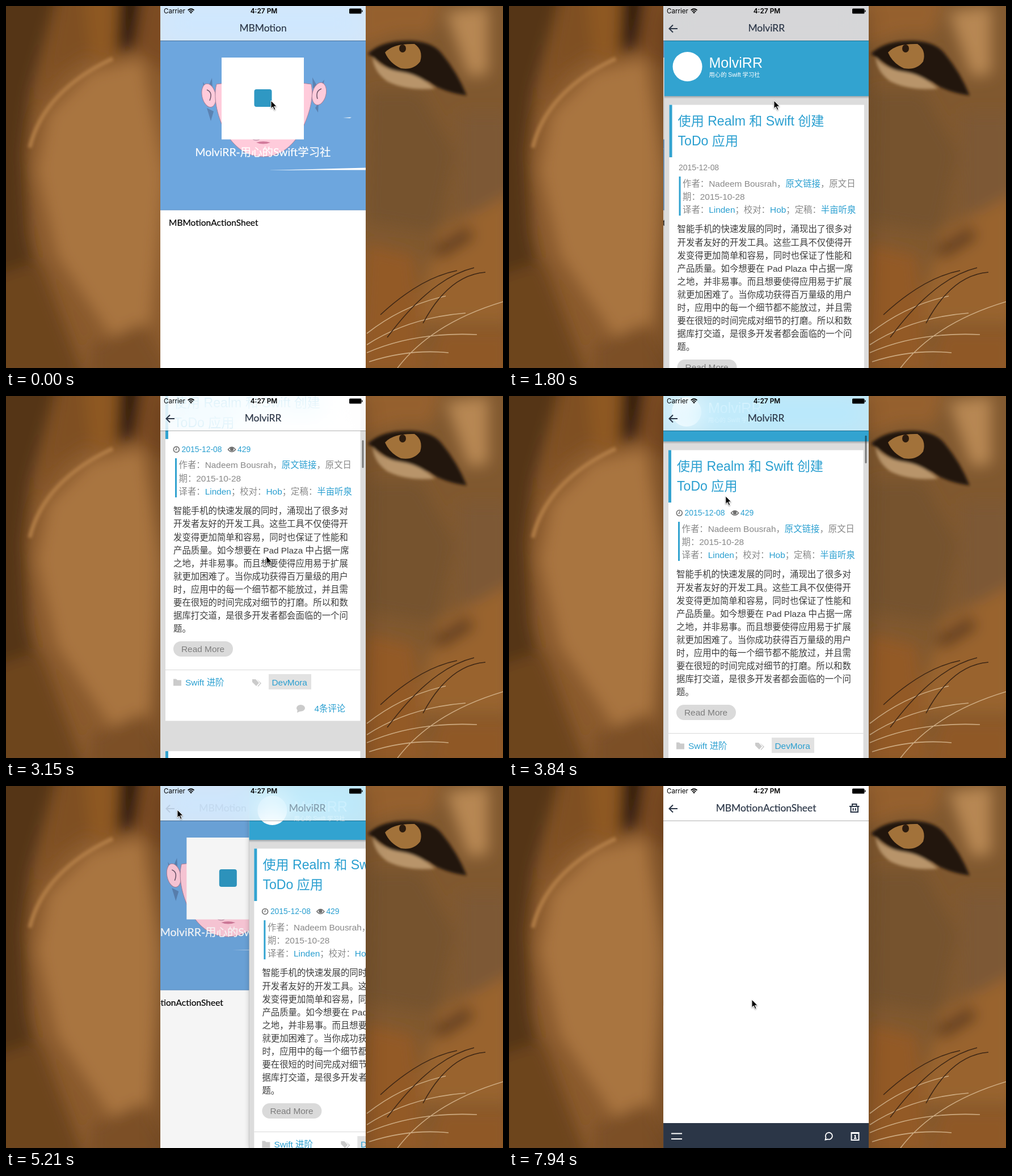
Animation of 876x639 px, one loop 8000 ms. Source, as an HTML page:

```html
<!DOCTYPE html>
<html lang="zh-CN">
<head>
<meta charset="utf-8">
<title>MBMotion</title>
<style>
  html, body { margin: 0; width: 100%; height: 100%; overflow: hidden; background: #7d5128; }
  svg { position: absolute; left: 0; top: 0; display: block; }
  text { font-family: "Liberation Sans", "Noto Sans CJK SC", "Noto Sans CJK", sans-serif; white-space: pre; }
  .geo { font-family: Lato, "Noto Sans CJK SC", "Noto Sans CJK", sans-serif; stroke-width: .2px; }
  .ui { font-family: Inter, sans-serif; }
  #phone, #glow { position: absolute; left: 272px; top: 0; width: 362px; height: 639px; }
  #phone { overflow: hidden; background: #fff; }
  #web, #sheet { box-shadow: 0 0 9px rgba(0, 0, 0, .2); }
  #nav { position: absolute; left: 0; top: 0; width: 362px; height: 61px;
    background: rgba(255, 255, 255, .72); backdrop-filter: blur(24px) saturate(1.6);
    box-shadow: 0 1px 0 rgba(0, 0, 0, .3); }
</style>
</head>
<body>
<svg id="photo" width="876" height="639">
  <defs>
    <filter id="soft" x="-50%" y="-50%" width="200%" height="200%"><feGaussianBlur stdDeviation="13"/></filter>
    <filter id="fine" x="-50%" y="-50%" width="200%" height="200%"><feGaussianBlur stdDeviation="2.5"/></filter>
  </defs>
  <rect width="272" height="639" fill="#8a5a2d"/>
  <rect x="634" width="242" height="639" fill="#80582f"/>
  <g filter="url(#soft)">
    <path d="M-40 -30H95L70 60 45 150 32 260 40 400 60 500-40 580Z" fill="#543517"/>
    <path d="M95 -30H150L150 80 90 120 50 200Z" fill="#7f5023"/>
    <path d="M135 -30H205L195 95 150 95Z" fill="#8e5824"/>
    <path d="M200 -30H240L228 70 195 85Z" fill="#26160a"/>
    <path d="M245 -30H300V130L225 75Z" fill="#7b4b22"/>
    <path d="M150 115 240 95 280 300 255 560 190 590 90 440 55 290 75 190Z" fill="#a97440"/>
    <path d="M-30 480 60 450 140 660H-30Z" fill="#6d451f"/>
    <path d="M150 600 240 560 300 660H150Z" fill="#7b4f27"/>
    <path d="M620 -20H770L750 50 690 50 620 75Z" fill="#95602d"/>
    <path d="M775 10 850 0 850 120 815 125Z" fill="#b78752"/>
    <path d="M640 150 730 150 790 260 760 400 634 380Z" fill="#76522f"/>
    <path d="M800 190H890V360L800 370Z" fill="#7d5834"/>
    <path d="M760 400 890 330V560L720 560Z" fill="#99642f"/>
    <path d="M634 420 720 440 740 650H620Z" fill="#935a27"/>
    <path d="M760 570H890V660H740Z" fill="#8f5826"/>
    <path d="M750 430 815 390 825 408 765 445Z" fill="#4f321a"/>
  </g>
  <g filter="url(#fine)">
    <path d="M638 84Q660 64 695 62 748 58 768 84 796 118 812 158 770 152 745 134 690 124 662 102Z" fill="#20140b"/>
    <path d="M646 90Q662 112 700 117 730 122 756 146 705 150 672 133 648 116 646 90Z" fill="#b8946a"/>
    <path d="M42 250Q66 150 188 93" fill="none" stroke="#b07b45" stroke-width="7"/>
  </g>
  <path d="M668 82Q682 66 720 67 736 78 730 98 718 114 696 110 676 101 668 82Z" fill="#a2723a"/>
  <ellipse cx="699" cy="75" rx="6" ry="7" fill="#2b1b0e"/>
  <g fill="none" stroke="#cdab82" stroke-width="1.6">
    <path d="M636 578Q700 528 775 512M636 598Q710 550 810 542M636 612Q720 575 830 580M640 628Q710 605 780 612M690 639Q750 560 876 522"/>
  </g>
  <path d="M672 585Q750 480 825 462M660 545Q730 480 795 467M735 560Q780 475 845 470" fill="none" stroke="#3d2615" stroke-width="1.5"/>
</svg>
<div id="glow"></div>
<div id="phone">
  <svg id="home"></svg>
  <svg id="web"></svg>
  <svg id="sheet"></svg>
  <div id="nav"></div>
  <svg id="bar"></svg>
</div>
<svg width="876" height="639">
  <path id="cursor" d="M0 0V14L3.2 11 5.8 16.6 8 15.6 5.5 10.2H10Z" fill="#000" stroke="#fff" stroke-width="1"
    style="filter:drop-shadow(0 1px 1px rgba(0,0,0,.4))"/>
</svg>
<script>
const $ = id => document.getElementById(id);
const BLUE = '#2a9fd0', INK = '#2b3647', W = 362, LOOP = 8000;

const rect = (x, y, w, h, fill, more = '') =>
  `<rect x="${x}" y="${y}" width="${w}" height="${h}" fill="${fill}" ${more}/>`;
const text = (x, y, size, fill, str, more = '') =>
  `<text x="${x}" y="${y}" font-size="${size}" fill="${fill}" ${more}>${str}</text>`;
const geo = (x, y, size, fill, str, more = '') =>
  text(x, y, size, fill, str, `class="geo" stroke="${fill}" ${more}`);
const lines = (x, y, fill, rows) =>
  rows.map((s, i) => text(x, y + i * 23.1, 15.4, fill, s)).join('');
const link = s => `<tspan fill="${BLUE}">${s}</tspan>`;

// Every view uses stage coordinates
function view(id, html) {
  const el = $(id);
  el.setAttribute('viewBox', '272 0 362 639');
  el.setAttribute('width', W);
  el.setAttribute('height', 639);
  el.innerHTML = html;
}

view('home', `
  ${rect(272, 0, W, 639, '#fff')}${rect(272, 0, W, 360, '#6da6de')}${rect(272, 359.5, W, 1, '#5f92c6')}
  <path d="M349 148 347 134 355 146 363 127 364 146ZM541 145 540 126 550 144 561 130 558 146ZM354 180 361 203 366 186ZM545 180 550 188 551 170Z" fill="#5b82b2"/>
  <g fill="#ffcbdb" stroke="#a98099" stroke-width="1">
    <ellipse cx="357.5" cy="158" rx="12" ry="21" transform="rotate(-12 357 158)"/>
    <ellipse cx="552" cy="155" rx="12" ry="20" transform="rotate(14 552 155)"/>
    <path d="M371 138C364 165 375 200 386 221 402 250 425 266 453 266S504 250 520 221C531 200 544 165 538 138Q455 125 371 138Z"/>
    <path d="M354 148Q365 152 359 167M556 146Q545 150 549 164" fill="none" stroke="#6b5368" stroke-width="1.5"/>
    <ellipse cx="441" cy="233" rx="7" ry="4"/>
  </g>
  <path d="M441 241Q453 237 466 241 453 246 441 241Z" fill="#d27b9b"/>
  <path d="M594 197 609 196.5 606 198ZM460 290 540 288 634 285.5V289.5L540 289.5Z" fill="#fff"/>
  ${rect(380, 91, 145, 144.5, '#fff')}${rect(437.5, 147, 31, 31, '#2f98c3', 'rx="4"')}
  ${geo(453, 264.5, 19.4, '#fff', 'MolviRR-用心的Swift学习社', 'text-anchor="middle"')}
  ${geo(287, 388, 15.5, '#000', 'MBMotionActionSheet')}
  ${rect(272, 0, W, 639, '#000', 'id="dim"')}`);

view('web', `
  ${rect(272, 0, W, 639, '#6c6e72')}
  <g id="page">
    ${rect(272, 61, W, 900, '#dcdcdc')}
    ${rect(272, 159, W, 2, '#a9afb3')}${rect(272, 161, W, 2, '#c8cacb')}
    ${rect(272, 61, W, 98, '#32a3d0')}
    <circle cx="313" cy="107" r="26" fill="#fff"/>
    ${text(351, 109, 25, '#fff', 'MolviRR')}
    ${text(351, 125, 10.3, '#fff', '用心的 Swift 学习社')}
    ${rect(281, 174.5, 343.5, 590, '#fff')}${rect(281, 174.5, 5, 92.5, '#32a3d0')}
    ${text(296, 211, 23.1, BLUE, '使用 Realm 和 Swift 创建')}
    ${text(296, 246, 23.1, BLUE, 'ToDo 应用')}
    ${text(297.5, 290, 13.9, '#888', '2015-12-08', 'id="date"')}
    <g id="meta">
      <g fill="none" stroke="#707070" stroke-width="1.6">
        <circle cx="300.3" cy="285.5" r="5"/><path d="M300.5 282V286H298" stroke-width="1.2"/>
        <path d="M391.5 285.5Q398 277.5 404.5 285.5 398 293.5 391.5 285.5Z"/>
        <circle cx="398" cy="285" r="2.4" fill="#707070"/>
      </g>
      ${text(408, 290, 13.9, '#888', '429', 'id="views"')}
    </g>
    ${rect(298, 301, 3, 69, '#32a3d0')}
    ${lines(304.5, 318.5, '#888', [
      `作者：Nadeem Bousrah，${link('原文链接')}，原文日`,
      '期：2015-10-28',
      `译者：${link('Linden')}；校对：${link('Hob')}；定稿：${link('半亩听泉')}`])}
    ${lines(295, 399.4, '#3c3c3c', [
      '智能手机的快速发展的同时，涌现出了很多对',
      '开发者友好的开发工具。这些工具不仅使得开',
      '发变得更加简单和容易，同时也保证了性能和',
      '产品质量。如今想要在 Pad Plaza 中占据一席',
      '之地，并非易事。而且想要使得应用易于扩展',
      '就更加困难了。当你成功获得百万量级的用户',
      '时，应用中的每一个细节都不能放过，并且需',
      '要在很短的时间完成对细节的打磨。所以和数',
      '据库打交道，是很多开发者都会面临的一个问',
      '题。'])}
    ${rect(295, 624, 105, 27, '#dadada', 'rx="13.5"')}
    ${text(309, 643, 15.4, '#7d7d7d', 'Read More')}
    ${rect(281, 674, 343.5, 1, '#d8d8d8')}
    <g fill="#cbcbcb">
      <path d="M295 690.5H300L302 692.5H309V702.5H295Z"/>
      <path d="M434 691H440L446 697.5 441 703 434 696ZM442 691 450 698 444.5 704 443.5 703 448 698Z"/>
      <ellipse cx="519.5" cy="742" rx="7.5" ry="5.8"/><path d="M514 744 513 750 520 747Z"/>
    </g>
    ${text(316, 702, 15.4, BLUE, 'Swift 进阶')}
    ${rect(463, 682, 75, 27, '#e2e2e2')}
    ${text(468.5, 702, 15.4, BLUE, 'DevMora')}
    ${text(543.5, 748, 15.4, BLUE, '4条评论')}
    ${rect(281, 818, 343.5, 140, '#fff')}${rect(281, 818, 5, 92, '#32a3d0')}
  </g>
  ${rect(627.5, 64, 3, 49, '#000', 'id="thumb" rx="1.5"')}`);

view('sheet', `
  ${rect(272, 0, W, 639, '#fff')}${rect(272, 595, W, 44, INK)}
  <g fill="none" stroke="#fff" stroke-width="2">
    <path d="M286 613.5H305M286 623H305"/>
    <path d="M557.5 624.5 558.5 620.5A6 6 0 1 1 562 623.5Z" stroke-width="1.8"/>
    <path d="M603.5 612H616.5V625H603.5ZM603.5 613H616.5M608.5 617H610.3V622M608 622H612.5"/>
  </g>`);

const title = (id, str) => geo(453, 45, 17.4, INK, str, `id="${id}" text-anchor="middle"`);
view('bar', `
  ${text(278, 13, 11.6, '#000', 'Carrier', 'class="ui"')}
  <path d="M320.7 7.5Q326 3 331.5 7.5M322.7 9.8Q326 7 329.5 9.8" fill="none" stroke="#000" stroke-width="1.7"/>
  <path d="M326 13.3 323.8 11.2Q326 9.8 328.3 11.2Z"/>
  ${text(454.5, 13, 11.9, '#000', '4:27 PM', 'class="ui" font-weight="600" text-anchor="middle"')}
  ${rect(605, 4.5, 21.5, 9, '#000', 'rx="1.5"')}${rect(627, 7.5, 1.5, 3, '#000')}
  ${title('homeTitle', 'MBMotion')}${title('webTitle', 'MolviRR')}${title('sheetTitle', 'MBMotionActionSheet')}
  <path id="back" d="M297 40H283M289 33.5 282.5 40 289 46.5" fill="none" stroke="${INK}" stroke-width="2"/>
  <path id="trash" d="M600 36H617.5M605 36V32H612.5V36M602.5 36V46H615V36M606.7 39V43.5M610.8 39V43.5"
    fill="none" stroke="${INK}" stroke-width="2"/>`);

// Piecewise linear track: keys are [time, value...]
function track(keys, t) {
  const i = keys.findIndex(k => k[0] > t);
  if (i < 0) return keys.at(-1).slice(1);
  if (!i) return keys[0].slice(1);
  const a = keys[i - 1], b = keys[i], p = (t - a[0]) / (b[0] - a[0]);
  return a.slice(1).map((v, j) => v + (b[j + 1] - v) * p);
}
const SCROLL = [[2650, 0], [2800, 45], [3000, 140], [3150, 191], [3230, 198], [3320, 198],
  [3430, 165], [3560, 122], [3700, 95], [3840, 79], [3980, 69], [4110, 64]];
const CURSOR = [[2430, 467, 167], [2650, 457, 474], [2800, 457, 429], [3000, 458, 334], [3150, 459, 283],
  [3320, 459, 276], [3560, 448, 352], [3840, 382, 177], [4110, 328, 85], [4460, 305, 35],
  [4630, 305, 35], [4860, 302, 42], [5500, 302, 42], [5890, 318, 92], [6350, 428, 421], [6550, 428, 377]];
const THUMB = [[2600, 0], [2700, .45], [4190, .45], [4460, 0]];

// Critically damped spring from 0 to 1
const spring = ms => ms <= 0 ? 0 : 1 - (1 + .0207 * ms) * Math.exp(-.0207 * ms);
const shift = (id, x, y = 0) => $(id).setAttribute('transform', `translate(${x} ${y})`);
const slide = (id, x) => $(id).style.transform = `translateX(${x}px)`;
const fade = (id, o) => $(id).style.opacity = Math.min(1, Math.max(0, o));

// Slides a pushed view in; parked further out so its shadow is hidden
const push = (id, p) => slide(id, p < .0005 ? W + 20 : W * (1 - p));

function draw(t) {
  const web = t < 5140 ? spring(t - 1433) : 1 - spring(t - 5140);
  const sheet = spring(t - 7380);
  const cover = Math.max(web, sheet);
  const [scroll] = track(SCROLL, t);

  slide('home', -.3 * W * cover);
  fade('dim', .07 * cover);
  push('web', web);
  push('sheet', sheet);

  shift('page', 0, -scroll);
  shift('thumb', 0, scroll * .073);
  fade('thumb', track(THUMB, t)[0]);
  const loaded = t >= 1980;
  $('date').setAttribute('x', loaded ? 309.5 : 297.5);
  fade('meta', loaded ? 1 : 0);
  for (const id of ['date', 'views']) $(id).setAttribute('fill', t >= 2130 ? BLUE : '#888');

  shift('homeTitle', -125 * cover);
  fade('homeTitle', 1 - 1.64 * cover);
  shift('webTitle', W / 2 * (1 - web));
  fade('webTitle', 1.3 * web - .3);
  shift('sheetTitle', W / 2 * (1 - sheet));
  fade('sheetTitle', 1.3 * sheet - .3);
  fade('back', 2 * cover - 1);
  fade('trash', 2 * sheet - 1);

  $('glow').style.boxShadow = t >= 1320 ? '0 8px 36px rgba(0,0,0,.2)' : 'none';
  shift('cursor', ...track(CURSOR, t));
}

const start = performance.now();
(function tick() {
  draw((performance.now() - start) % LOOP);
  requestAnimationFrame(tick);
})();
</script>
</body>
</html>
```
